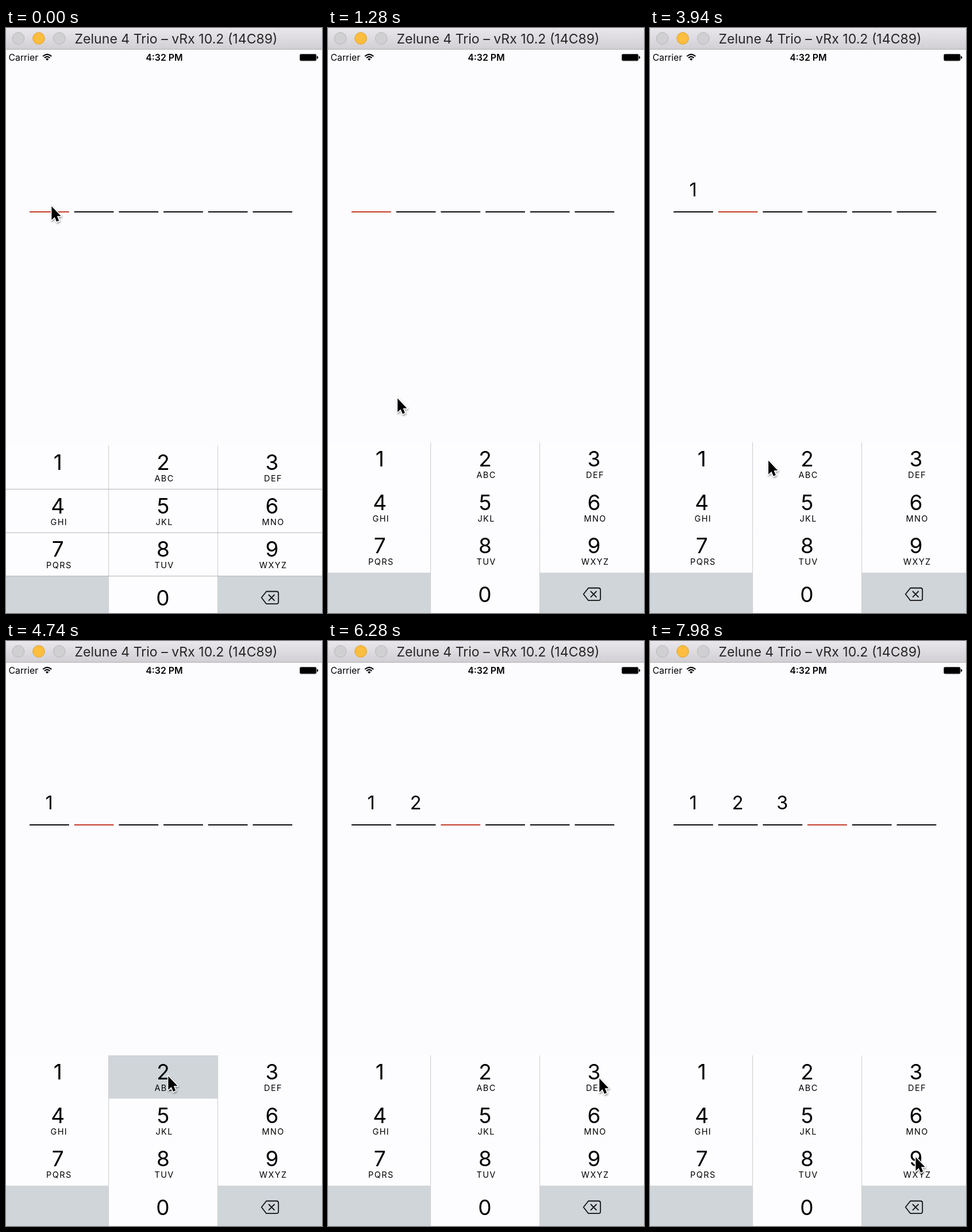
These frames come from a looping animation (550x1018 px, 8000 ms). An HTML page:

```html
<!DOCTYPE html>
<html lang="en">
<head>
<meta charset="utf-8">
<title>Passcode entry</title>
<style>
  html, body { margin: 0; width: 100%; height: 100%; overflow: hidden; background: #fcfcfe; }
  svg { display: block; width: 550px; height: 1018px; }
  text { font-family: Inter, Roboto, sans-serif; fill: #000; }
  .mid { text-anchor: middle; }
  .key { font-size: 37px; }
  .sub { font-size: 14.5px; letter-spacing: 1.4px; }
  .entry { font-size: 32.5px; }
</style>
</head>
<body>
<svg viewBox="0 0 550 1018">
  <defs>
    <linearGradient id="bar" x2="0" y2="1">
      <stop offset="0" stop-color="#e9e7eb"/>
      <stop offset="1" stop-color="#d1cfd4"/>
    </linearGradient>
    <filter id="shadow" x="-50%" y="-50%" width="200%" height="200%">
      <feDropShadow dx="1" dy="2" stdDeviation="1.6" flood-opacity=".4"/>
    </filter>
  </defs>
  <rect width="550" height="1018" fill="#fcfcfe"/>

  <rect width="550" height="37" fill="url(#bar)"/>
  <rect y="36.5" width="550" height="1.2" fill="#b3b1b5"/>
  <g fill="#d0cfd2" stroke="#b6b5b8">
    <circle cx="21.5" cy="18" r="10.3"/>
    <circle cx="57" cy="18" r="10.3" fill="#fdbd3e" stroke="#dfa034"/>
    <circle cx="92.7" cy="18" r="10.3"/>
  </g>
  <text x="119.5" y="27" font-size="23.1" style="fill:#262626">Zelune 4 Trio – vRx 10.2 (14C89)</text>

  <text x="4.5" y="57" font-size="15.8">Carrier</text>
  <g fill="none" stroke="#000" stroke-width="2.1">
    <path d="M64.2 49.2Q71.7 42.4 79.2 49.2"/>
    <path d="M66.9 52Q71.7 47.6 76.5 52"/>
    <path d="M69 53.9Q71.7 51.5 74.4 53.9L71.7 56.7Z" fill="#000" stroke="none"/>
  </g>
  <text class="mid" x="275.5" y="57" font-size="15.9" font-weight="600">4:32 PM</text>
  <rect x="511.5" y="45.5" width="28.5" height="11.5" rx="2" stroke="#555"/>
  <path d="M541 48.8Q543.4 49 543.4 51.2T541 53.7Z"/>

  <g id="fields"></g>
  <g id="pad"></g>
  <g id="cursor" filter="url(#shadow)">
    <path d="M-.6 1.2V25L4.7 20L8.2 28L12.2 26.3L8.8 18.3H15.6Z"
      stroke="#fff" stroke-width="3" stroke-linejoin="round" paint-order="stroke"/>
  </g>
</svg>
<script>
const LOOP = 8000;
const BLACK = '#0a0a0a', RED = '#c43c28', GRAY = '#d0d5da', WHITE = '#fdfdff';
const byId = id => document.getElementById(id);

function add(parent, tag, attrs, text = '') {
  const el = document.createElementNS('http://www.w3.org/2000/svg', tag);
  for (const name in attrs) el.setAttribute(name, attrs[name]);
  el.textContent = text;
  parent.append(el);
  return el;
}

const clamp = u => Math.min(1, Math.max(0, u));
const easeOut = u => 1 - (1 - u) ** 3;
const easeInOut = u => u * u * (3 - 2 * u);

// Each glide leaves where the last one ended; bend bows its path
const home = { x: 80, y: 309 };
const glides = [
  { start: 840, end: 1940, x: 110, y: 735, ease: easeOut, bend: [29, 0] },
  { start: 3380, end: 4420, x: 283, y: 756, ease: easeInOut, bend: [0, 5] },
  { start: 5150, end: 5870, x: 473, y: 760, ease: easeInOut, bend: [0, -7] },
  { start: 7250, end: 7960, x: 463, y: 897, ease: easeInOut, bend: [0, 0] }
];

function cursorAt(t) {
  let { x, y } = home;
  for (const g of glides) {
    const p = g.ease(clamp((t - g.start) / (g.end - g.start)));
    const bow = Math.sin(Math.PI * p);
    x += (g.x - x) * p + g.bend[0] * bow;
    y += (g.y - y) * p + g.bend[1] * bow;
  }
  return [x, y];
}

// Keys 1, 2, 3 are pressed at an even beat
const TAPS = 3, HOLD = 370;
const tapTime = i => 2380 + 2010 * i;

const fields = byId('fields'), lines = [], entries = [];
for (let i = 0; i < 6; i++) {
  const x = 41 + 77.7 * i;
  lines.push(add(fields, 'rect', { x, y: 319, width: 68.8, height: 2 }));
  if (i < TAPS)
    entries.push(add(fields, 'text', { class: 'mid entry', x: x + 34, y: 293 }, i + 1));
}

const pad = byId('pad');
const edges = [0, 178.5, 369, 550], centres = [90.2, 273.5, 463];
const rowTop = r => 721 + 75.6 * r;
const letters = ['', 'ABC', 'DEF', 'GHI', 'JKL', 'MNO', 'PQRS', 'TUV', 'WXYZ'];

const cells = Array.from({ length: 12 }, (_, i) => {
  const c = i % 3, r = Math.floor(i / 3);
  return add(pad, 'rect', {
    x: edges[c], y: rowTop(r), width: edges[c + 1] - edges[c], height: 75.6,
    fill: i === 9 || i === 11 ? GRAY : WHITE
  });
});
for (const x of [178, 368])
  add(pad, 'rect', { x, y: rowTop(0), width: 1.1, height: 303, fill: '#cfd0d3' });
const rules = [1, 2, 3].map(r =>
  add(pad, 'rect', { x: 0, y: rowTop(r) - 0.5, width: 550, height: 1, fill: '#b0b2b7' }));

letters.forEach((word, i) => {
  const x = centres[i % 3], y = rowTop(Math.floor(i / 3)) + 42;
  add(pad, 'text', { class: 'mid key', x, y }, i + 1);
  add(pad, 'text', { class: 'mid sub', x: x + 2.1, y: y + 20.2 }, word);
});
add(pad, 'text', { class: 'mid key', x: 273, y: rowTop(3) + 50.7 }, 0);
add(pad, 'path', {
  d: 'M453.2 974.5H470.7Q474.2 974.5 474.2 978V992.7Q474.2 996.2 470.7 996.2H453.2L444.7 985.3Z' +
    'M457.5 980.5L467 990.2M467 980.5L457.5 990.2',
  fill: 'none', stroke: '#111', 'stroke-width': 1.8,
  'stroke-linejoin': 'round', 'stroke-linecap': 'round'
});

function draw(t) {
  byId('cursor').setAttribute('transform', `translate(${cursorAt(t)})`);

  const drop = 6 * (1 - clamp((t - 20) / 240)) ** 2;
  pad.setAttribute('transform', `translate(0 ${drop})`);
  rules.forEach(r => r.setAttribute('opacity', drop > 0 ? 1 : 0));

  let typed = 0;
  for (let i = 0; i < TAPS; i++) {
    const since = t - tapTime(i), done = since >= HOLD;
    if (done) typed++;
    cells[i].setAttribute('fill', since >= 0 && !done ? GRAY : WHITE);
    entries[i].setAttribute('opacity', done ? 1 : 0);
  }
  lines.forEach((line, i) => line.setAttribute('fill', i === typed ? RED : BLACK));
}

const start = performance.now();
function tick() {
  draw((performance.now() - start) % LOOP);
  requestAnimationFrame(tick);
}
tick();
</script>
</body>
</html>
```
